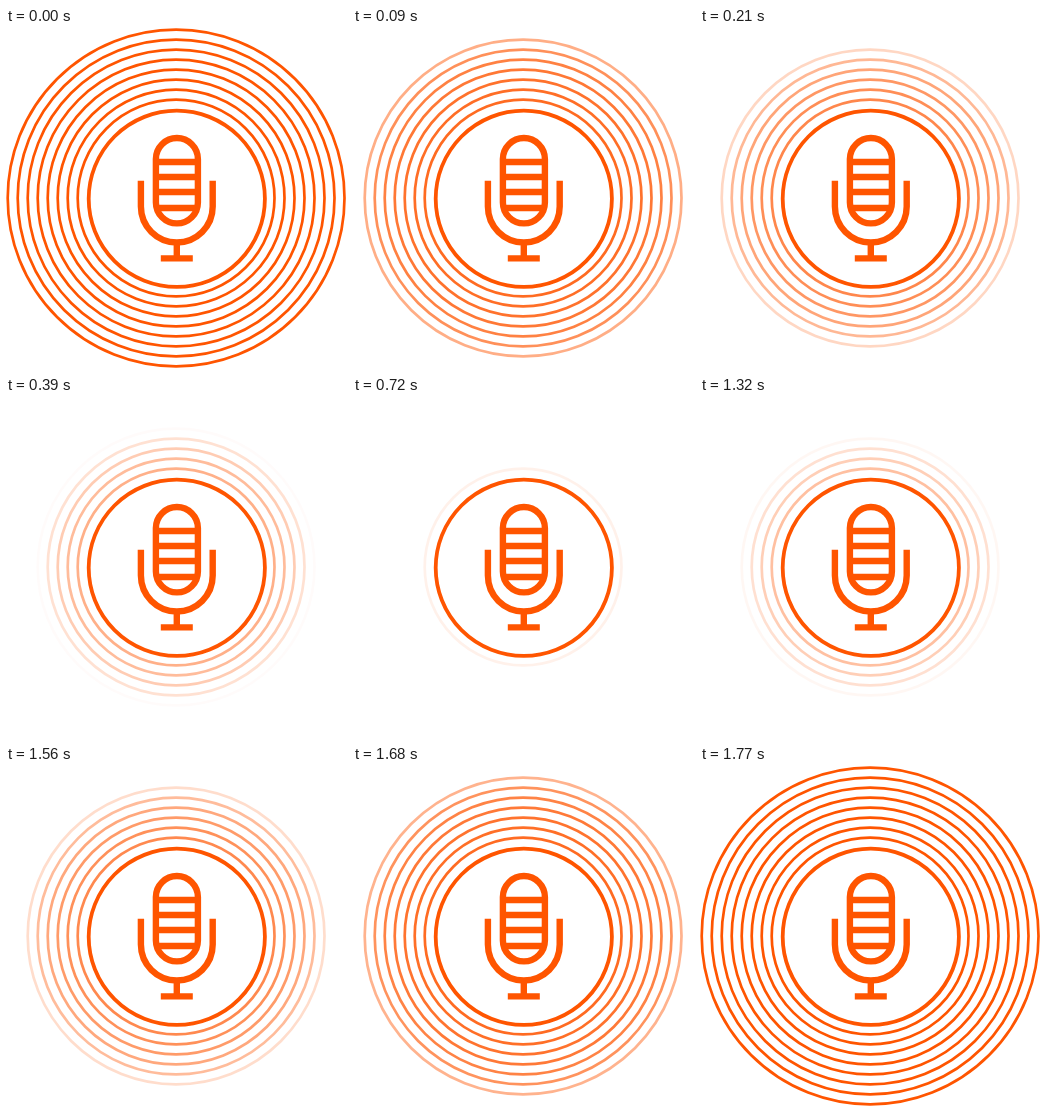
Recreate the animation shown at these times as an HTML page. Size 341 px wide and 341 px high, loop 1800 ms.

```html
<!DOCTYPE html>
<html lang="en">
<head>
<meta charset="utf-8">
<title>Microphone pulse</title>
<style>
  html, body { margin: 0; width: 100%; height: 100%; overflow: hidden; background: #fff; }
  svg { display: block; width: 100%; height: 100%; }
</style>
</head>
<body>
<svg viewBox="0 0 341 341" fill="none" stroke="#ff5500">
  <g id="rings" stroke-width="2.7"></g>
  <circle cx="170.8" cy="170.8" r="88.1" stroke-width="3.8"/>
  <g stroke-width="6.4">
    <rect x="149.9" y="110" width="42" height="85.4" rx="21"/>
    <path d="M150 134h42M150 149h42M150 164h42M150 180h42"/>
    <path d="M134.9 152.8v25.8a35.9 35.9 0 0 0 71.8 0v-25.8M170.8 214.5v15M154.8 230.4h32"/>
  </g>
</svg>
<script>
  const LOOP = 1800, STEP = 30, COUNT = 8;
  const group = document.getElementById('rings');

  const rings = Array.from({ length: COUNT }, (_, k) => {
    const ring = document.createElementNS('http://www.w3.org/2000/svg', 'circle');
    ring.setAttribute('cx', 170.1);
    ring.setAttribute('cy', 170);
    ring.setAttribute('r', 98.4 + 10 * k);
    group.append(ring);
    return ring;
  });

  // Outer rings vanish first and return last; all are full at the loop point.
  function opacity(k, t) {
    const gone = 825 - 105 * k;
    const back = 975 + 102 * k;
    const level = t < gone ? 1 - t / gone : (t - back) / (LOOP - STEP - back);
    return Math.pow(Math.min(1, Math.max(0, level)), 1.2);
  }

  function draw(now) {
    const t = Math.floor((now % LOOP) / STEP) * STEP;
    rings.forEach((ring, k) => ring.setAttribute('opacity', opacity(k, t).toFixed(3)));
  }

  let start;
  function tick(now) {
    start ??= now;
    draw(Math.max(0, now - start));
    requestAnimationFrame(tick);
  }
  draw(0);
  requestAnimationFrame(tick);
</script>
</body>
</html>
```
